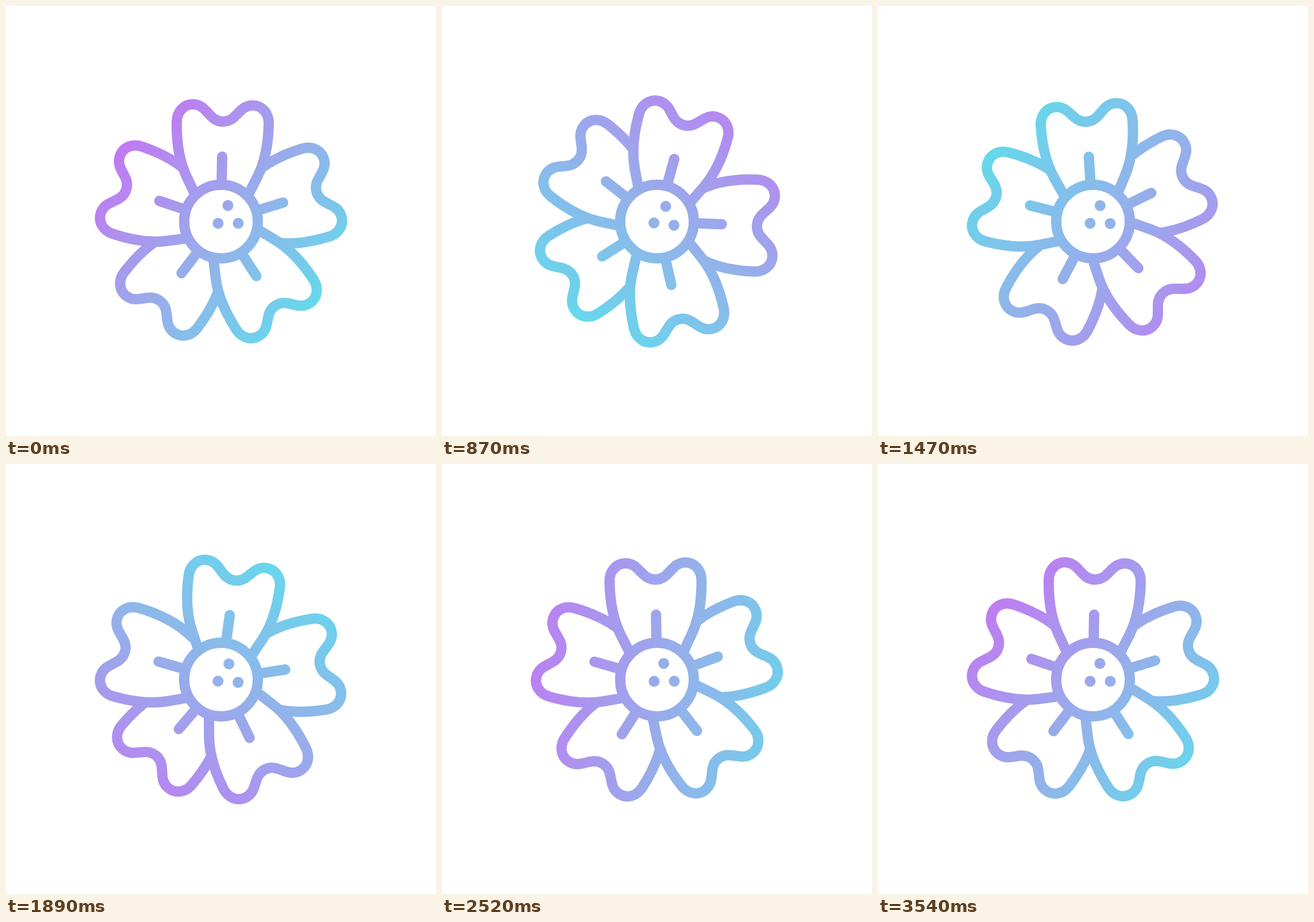
Write an HTML page that moves like this. It is 748 px wide and 748 px high and loops after 3.57 s.

```html
<!DOCTYPE html>
<html lang="en">
<head>
<meta charset="utf-8">
<title>Flower</title>
<style>
  html, body { margin: 0; width: 100%; height: 100%; overflow: hidden; background: #fff; }
  svg { display: block; width: 100vw; height: 100vh; }
  .line { fill: #000; stroke: #fff; stroke-width: 18; stroke-linecap: round; stroke-linejoin: round; }
</style>
</head>
<body>
<svg viewBox="-374 -375 748 748">
  <defs>
    <linearGradient id="paint" gradientUnits="userSpaceOnUse">
      <stop offset="0" stop-color="#c278f2"/>
      <stop offset="0.55" stop-color="#92b3ea"/>
      <stop offset="1" stop-color="#60ddec"/>
    </linearGradient>
    <g id="petal" class="line">
      <path d="M-44-42L-62-79C-75-106-80-135-80-172C-80-190-68-203-52-203C-27-203-25-174 0-174
               C25-174 27-203 52-203C68-203 80-190 80-172C80-135 75-106 62-79L44-42"/>
      <path d="M0-64V-113"/>
    </g>
    <mask id="flower" maskUnits="userSpaceOnUse" x="-374" y="-375" width="748" height="748">
      <!-- data-step: place in the wave, data-rest: resting angle -->
      <use href="#petal" data-step="2" data-rest="73"/>
      <use href="#petal" data-step="4" data-rest="217.5"/>
      <use href="#petal" data-step="5" data-rest="288.5"/>
      <use href="#petal" data-step="1" data-rest="1"/>
      <use href="#petal" data-step="3" data-rest="147"/>
      <circle class="line" r="64"/>
      <g fill="#fff" data-step="0" data-rest="0">
        <circle cx="12" cy="-28" r="9.5"/>
        <circle cx="-5" cy="3" r="9.5"/>
        <circle cx="30" cy="3" r="9.5"/>
      </g>
    </mask>
  </defs>
  <rect x="-374" y="-375" width="748" height="748" fill="url(#paint)" mask="url(#flower)"/>
</svg>
<script>
const LOOP = 3570, TICK = 30, DELAY = 95;
const parts = [...document.querySelectorAll('[data-step]')];
const paint = document.getElementById('paint');

// Easing with control points (x1, 0) and (x2, 1)
const bezier = (x1, x2) => x => {
  let lo = 0, hi = 1;
  for (let i = 0; i < 22; i++) {
    const s = (lo + hi) / 2, r = 1 - s;
    if (3 * x1 * s * r * r + 3 * x2 * s * s * r + s * s * s < x) lo = s; else hi = s;
  }
  return lo * lo * (3 - 2 * lo);
};
const launch = bezier(0.4, 0.23), sway = bezier(0.36, 0.64);

// Swing extremes: [time, degrees]; each part reaches them DELAY later than the one before
const SWING = [[620, 20.3], [1168, -11.3], [1690, 8.1], [2190, -5.1], [2590, 0]];

function swing(t, step) {
  let from = 0, a = 0, ease = launch;
  for (const [time, b] of SWING) {
    const to = time + step * DELAY;
    if (t < to) return a + (b - a) * ease((t - from) / (to - from));
    from = to; a = b; ease = sway;
  }
  return a;
}

// Gradient: [time, direction of violet, violet reach, cyan reach]
const TURN = [
  [0, 222, 218, 242],
  [270, 228, 262, 295],
  [870, 307, 296, 246],
  [1470, 402, 325, 245],
  [1890, 481, 296, 255],
  [2520, 548, 267, 315],
  [3570, 581, 233, 275]
];

function slope(i, c) {
  const a = TURN[i - 1], b = TURN[i + 1];
  return a && b ? (b[c] - a[c]) / (b[0] - a[0]) : 0;
}

function track(t, c) {
  let i = 0;
  while (i < TURN.length - 2 && t >= TURN[i + 1][0]) i++;
  const p = TURN[i], q = TURN[i + 1], d = q[0] - p[0], u = (t - p[0]) / d, v = 1 - u;
  return v * v * (1 + 2 * u) * p[c] + u * u * (3 - 2 * u) * q[c]
    + d * u * v * (v * slope(i, c) - u * slope(i + 1, c));
}

function draw(now) {
  const t = Math.floor((now % LOOP) / TICK) * TICK;
  for (const el of parts) {
    const { step, rest } = el.dataset;
    el.setAttribute('transform', `rotate(${+rest + swing(t, +step)})`);
  }
  const angle = track(t, 1) * Math.PI / 180, x = Math.cos(angle), y = Math.sin(angle);
  const near = track(t, 2), far = -track(t, 3);
  const ends = { x1: x * near, y1: y * near, x2: x * far, y2: y * far };
  for (const key in ends) paint.setAttribute(key, ends[key]);
  requestAnimationFrame(draw);
}
draw(0);
</script>
</body>
</html>
```
